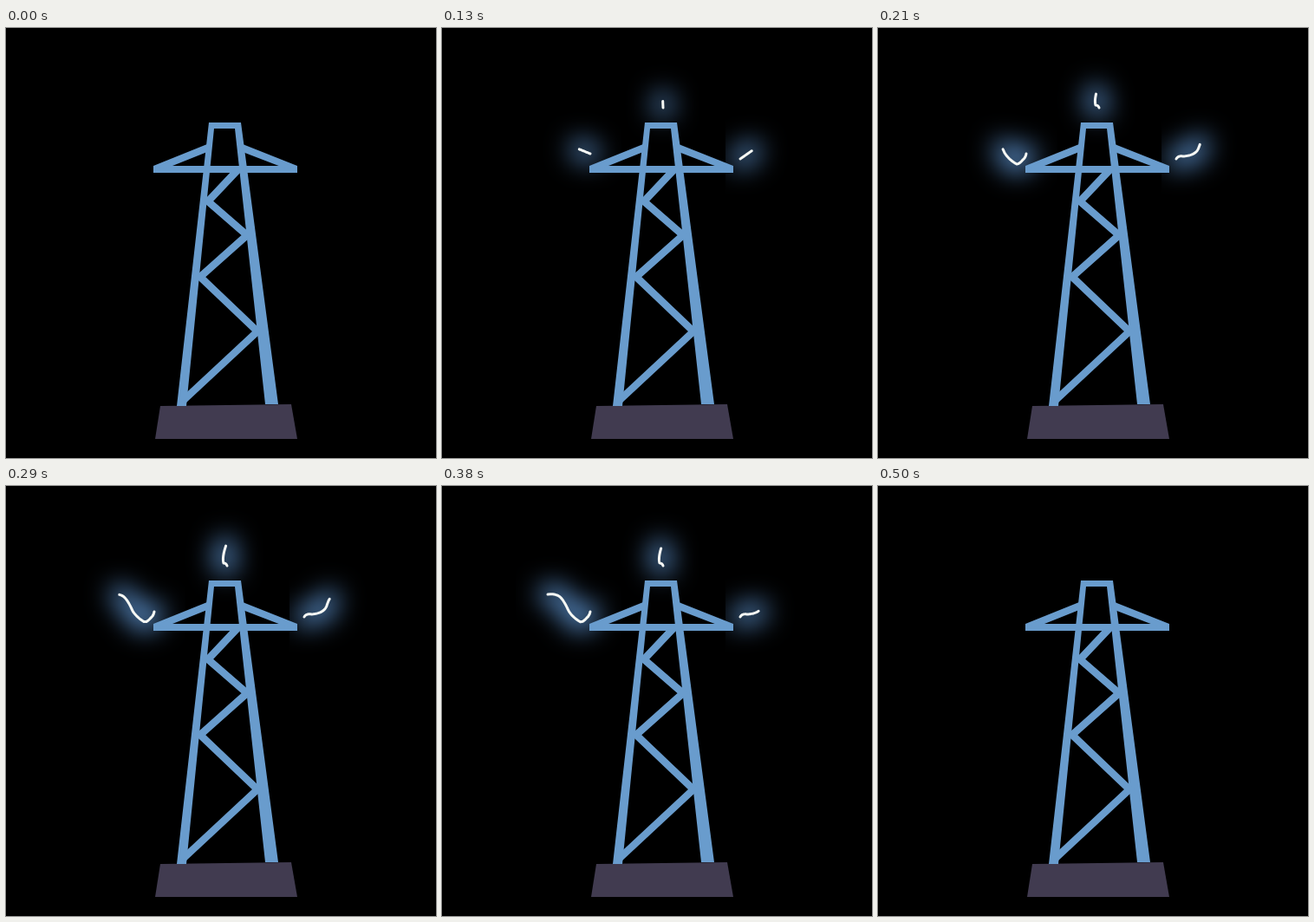
Write an HTML page that moves like this. It is 496 px wide and 496 px high and loops after 0.79 s.

```html
<!DOCTYPE html>
<html lang="en">
<head>
<meta charset="utf-8">
<title>Power pylon</title>
<style>
  html, body { margin: 0; height: 100%; overflow: hidden; background: #000; }
  svg { display: block; width: 100%; height: 100%; }
  polyline { fill: none; stroke-linecap: round; stroke-linejoin: round; }
  .halo { stroke: #6199d8; stroke-width: 20; }
  .bolt { stroke: #f6f8f4; stroke-width: 3; }
  .steel { fill: #699ccd; }
  .steel polyline { stroke: #699ccd; stroke-width: 8.5; stroke-linejoin: miter; stroke-linecap: butt; }
</style>
</head>
<body>
<svg id="stage" viewBox="0 0 496 496">
  <defs id="defs"></defs>
  <g id="halos"></g>
  <path fill="#413b50" d="M178 436L329 434L336 474H172Z"/>
  <g class="steel">
    <path d="M234 109H271L314 434H299L264 116H240L208 436H197Z"/>
    <path d="M170 159H336V167H170Z"/>
    <path d="M170 159L232 134V143L182 163Z"/>
    <path d="M336 159L273 134V143L325 163Z"/>
    <polyline points="267,164 233,200 278,239 224,287 290,350 203,431"/>
  </g>
  <g id="bolts"></g>
</svg>
<script>
const LOOP = 790, STEPS = 12, SAMPLES = 24;

// Each bolt runs from root to tip, is longest at its peak step,
// and its glow is confined to a column starting at `left`.
const sparks = [
  { left: 85, peak: 9, d: 'M171 145Q170 150 167 152Q163 157 160 157Q151 152 146 144Q139 128 133 126T122 125' },
  { left: 205, peak: 8, d: 'M255 92Q254 89 251 89Q249 82 254 68' },
  { left: 327, peak: 6.5, d: 'M344 151Q346 147 352 148Q367 147 370 138T374 130' }
];

function add(parent, tag, attributes) {
  const node = document.createElementNS('http://www.w3.org/2000/svg', tag);
  for (const name in attributes) node.setAttribute(name, attributes[name]);
  return document.getElementById(parent).appendChild(node);
}

sparks.forEach((spark, i) => {
  add('defs', 'filter', {
    id: 'glow' + i, filterUnits: 'userSpaceOnUse',
    x: spark.left, y: 25, width: 122, height: 190,
    'color-interpolation-filters': 'sRGB'
  }).innerHTML = '<feGaussianBlur stdDeviation="15"/>';
  spark.path = add('defs', 'path', { d: spark.d });
  spark.lines = [
    add('halos', 'polyline', { class: 'halo', filter: `url(#glow${i})` }),
    add('bolts', 'polyline', { class: 'bolt' })
  ];
});

const mix = (a, b, t) => a + (b - a) * t;
const ease = t => {
  t = Math.min(1, Math.max(0, t));
  return t * t * (3 - 2 * t);
};
const stepStart = step => Math.round(step * 12.5 / 3) * 10;

// A bolt starts as a straight chord and bends into its path as it grows.
function boltPoints(path, reach, bend) {
  const length = path.getTotalLength();
  const root = path.getPointAtLength(0), tip = path.getPointAtLength(length);
  return Array.from({ length: SAMPLES + 1 }, (_, i) => {
    const t = reach * i / SAMPLES;
    const p = path.getPointAtLength(length * t);
    return ['x', 'y'].map(axis => mix(mix(root[axis], tip[axis], t), p[axis], bend));
  }).join(' ');
}

function draw(time) {
  let step = 0;
  while (step < STEPS && stepStart(step + 1) <= time) step++;
  const lit = step > 0 && step < STEPS;
  halos.style.visibility = bolts.style.visibility = lit ? 'visible' : 'hidden';
  if (!lit) return;

  const bend = ease((step - 3) / 2);
  for (const { path, peak, lines } of sparks) {
    const reach = ease(step < peak ? step / peak : (STEPS - step) / (STEPS - peak));
    const points = boltPoints(path, reach, bend);
    lines.forEach(line => line.setAttribute('points', points));
  }
}

function tick() {
  draw(performance.now() % LOOP);
  requestAnimationFrame(tick);
}
tick();
</script>
</body>
</html>
```
